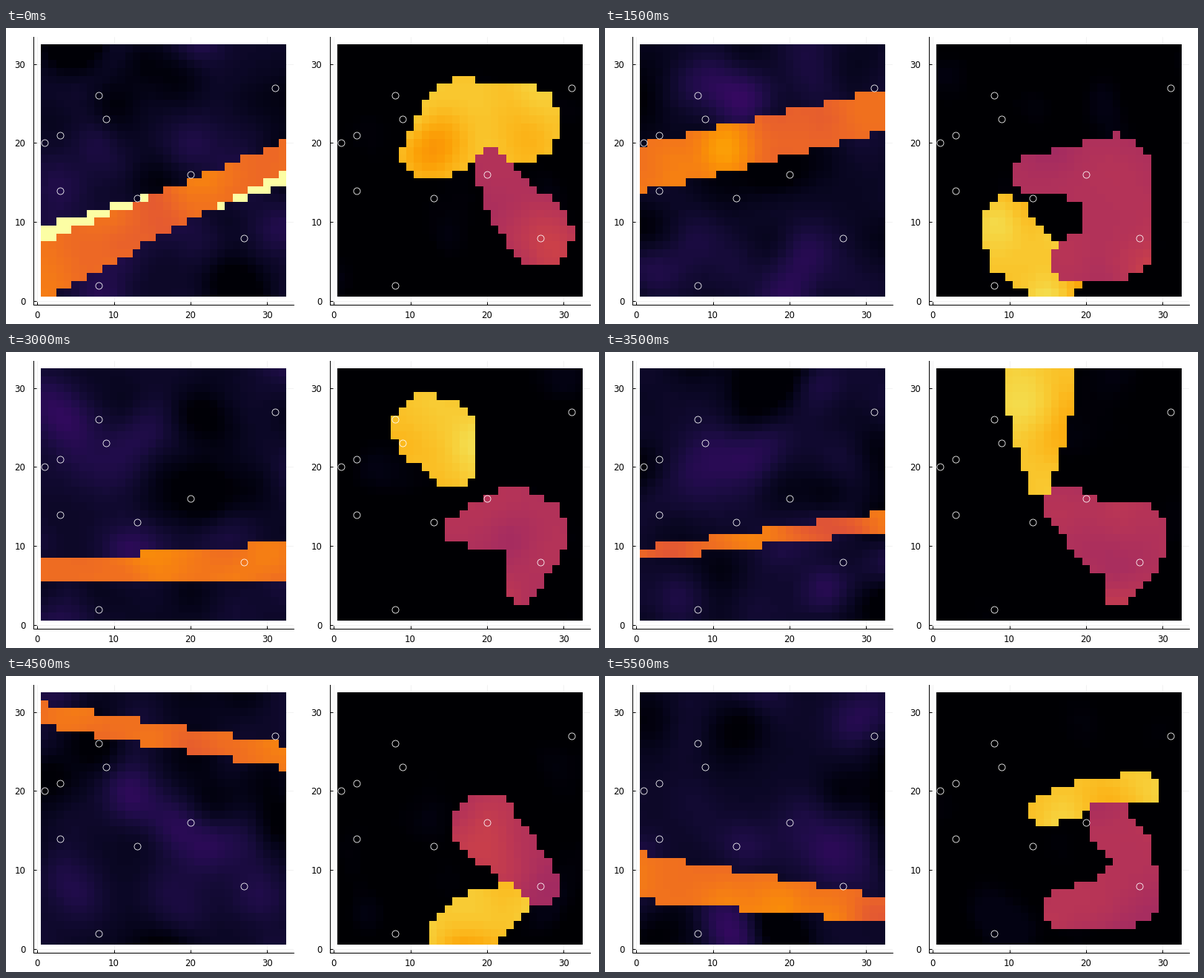
A matplotlib script for the animation above (6000 ms loop, 800 px wide and 400 px high).

```python
import math

import matplotlib.pyplot as plt
import numpy as np
from matplotlib.animation import FuncAnimation

plt.rcParams["font.family"] = "DejaVu Sans"

N = 32
FRAMES = 12
X, Y = np.meshgrid(np.arange(1, N + 1), np.arange(1, N + 1))
SITES = [(1, 20), (3, 21), (3, 14), (8, 26), (9, 23),
         (13, 13), (20, 16), (8, 2), (27, 8), (31, 27)]

# Band edges per pose: low edge at both sides, then high edge at both sides.
ORANGE = [(.31, 16.34, 7.365, 20.23), (2.02, 9.77, 6.48, 14.85),
          (13.79, 21.275, 19.8, 26.7), (2.73, .144, 6.5, 6.5),
          (8.146, 11.804, 9.743, 14.176), (28.18, 22.91, 31.01, 25.85),
          (6.16, 3.34, 12.05, 6.53)]
PALE = [(4.11, 14.34, 9.454, 18.258), (13.82, 20.98, 16.05, 26.02)]

# Blobs are brush strokes through (x, y, radius) key points, one per pose.
GOLD = [[(12.5, 18.8, 3.6), (16.5, 22.7, 5.5), (25, 22.5, 4.7)],
        [(25.2, 25.4, 3), (28, 22, 5), (30.5, 18.5, 4)],
        [(9.7, 10, 3.1), (11, 6.5, 4), (16, 2.5, 3.3)],
        [(10.2, 18.5, 4.6), (14, 20.3, 4.7), (17.6, 22, 4.3)],
        [(14, 31, 4.2), (14, 28.5, 4.4), (14, 18.3, 1.7)],
        [(14.8, 1.8, 2.6), (19, 3.5, 3.9), (23.4, 6, 2.3)],
        [(14.7, 17.6, 2.2), (20, 19.3, 2), (27.5, 20.4, 2.1)]]
ROSE = [[(20.4, 17.3, 2.1), (23.4, 12.3, 3.6), (27, 8.4, 4.1)],
        [(15, 15.7, 1.6), (22, 11.8, 6), (30.5, 11, 2.9)],
        [(13, 15.8, 2.5), (24.3, 16.8, 4.3), (24.3, 7.5, 4.7), (18.3, 4.8, 2.6)],
        [(15.7, 8.6, 1.3), (24.5, 16, 3.7), (27, 12.5, 3.6), (24.8, 4.7, 2.3)],
        [(16.8, 15.4, 2.3), (22.5, 11, 4.5), (26.3, 10.8, 4.6), (24.2, 4.6, 2)],
        [(19.8, 15.5, 4.2), (25, 10.5, 3), (27.2, 8, 2.4)],
        [(23, 16, 2.9), (26, 12.5, 2.7), (26, 6.5, 3.7), (17, 5, 2.5)]]


def resample(stroke, count=60):
    t = np.linspace(0, 1, len(stroke))
    return np.transpose([np.interp(np.linspace(0, 1, count), t, values)
                         for values in zip(*stroke)])


def blob(stroke):
    x, y, radius = stroke.T[:, :, None, None]
    return (np.hypot(X - x, Y - y) <= radius).any(axis=0)


def band(edges):
    low_left, low_right, high_left, high_right = edges
    t = (X - 1) / (N - 1)
    low = low_left + (low_right - low_left) * t
    high = high_left + (high_right - high_left) * t
    return (Y >= low) & (Y <= high)


def noise(rng, size=2.5, count=90):
    """Smooth random field with zero mean and unit spread."""
    x, y = rng.uniform(-2, N + 3, (2, count, 1, 1))
    height = rng.normal(size=(count, 1, 1))
    field = (height * np.exp(-((X - x) ** 2 + (Y - y) ** 2) / (2 * size ** 2))).sum(axis=0)
    return (field - field.mean()) / field.std()


def paint(field, mask, level, spread, rng):
    field[mask] = (level + spread * noise(rng))[mask]


def render(frame):
    # After the opening, each pose holds every other frame, with a blend between.
    pose = (frame + 1) / 2 if frame else 0
    a, b = math.floor(pose), math.ceil(pose)

    def blend(shapes):
        return (np.asarray(shapes[a]) + np.asarray(shapes[b])) / 2

    rng = np.random.default_rng(40 + frame)
    left = np.clip(.075 + .032 * noise(rng), .01, .2)
    if a == b and a < len(PALE):
        left[band(PALE[a])] = 1
    paint(left, band(blend(ORANGE)), .69, .025, rng)

    right = np.clip(.016 * noise(rng) - .008, 0, .035)
    paint(right, blob(blend(GOLD_STROKES)), .865, .025, rng)
    paint(right, blob(blend(ROSE_STROKES)), .48, .018, rng)
    return left, right


def panel(left):
    ax = fig.add_axes([left / 800, 1 - 374 / 400, 351 / 800, 362.4 / 400])
    ax.set(xlim=(-.46, 33.46), ylim=(-.46, 33.46),
           xticks=range(0, 31, 10), yticks=range(0, 31, 10))
    ax.spines[["top", "right"]].set_visible(False)
    ax.spines[["left", "bottom"]].set_linewidth(.72)
    ax.set_axisbelow(True)
    ax.grid(color="black", alpha=.1, lw=.36)
    ax.tick_params(direction="in", length=2.9, width=.72, labelsize=8.5)
    ax.tick_params(axis="x", pad=5.8)
    ax.tick_params(axis="y", pad=8)
    # The extent ends on whole pixels, so no edge is smeared outward.
    image = ax.imshow(np.zeros((N, N)), cmap="inferno", vmin=0, vmax=1, origin="lower",
                      extent=(.48, 32.46, .572, 32.484), aspect="auto",
                      interpolation="nearest", zorder=2)
    ax.plot(*zip(*SITES), "o", mfc="none", mec="white", ms=6.5, mew=.58, zorder=3)
    return image


GOLD_STROKES = [resample(stroke) for stroke in GOLD]
ROSE_STROKES = [resample(stroke) for stroke in ROSE]
fig = plt.figure(figsize=(8, 4), dpi=100, facecolor="white")
images = [panel(37.3), panel(437.3)]


def update(frame):
    for image, values in zip(images, render(frame)):
        image.set_data(values)
    return images


anim = FuncAnimation(fig, update, frames=FRAMES, interval=500, repeat=True)
plt.show()
```
